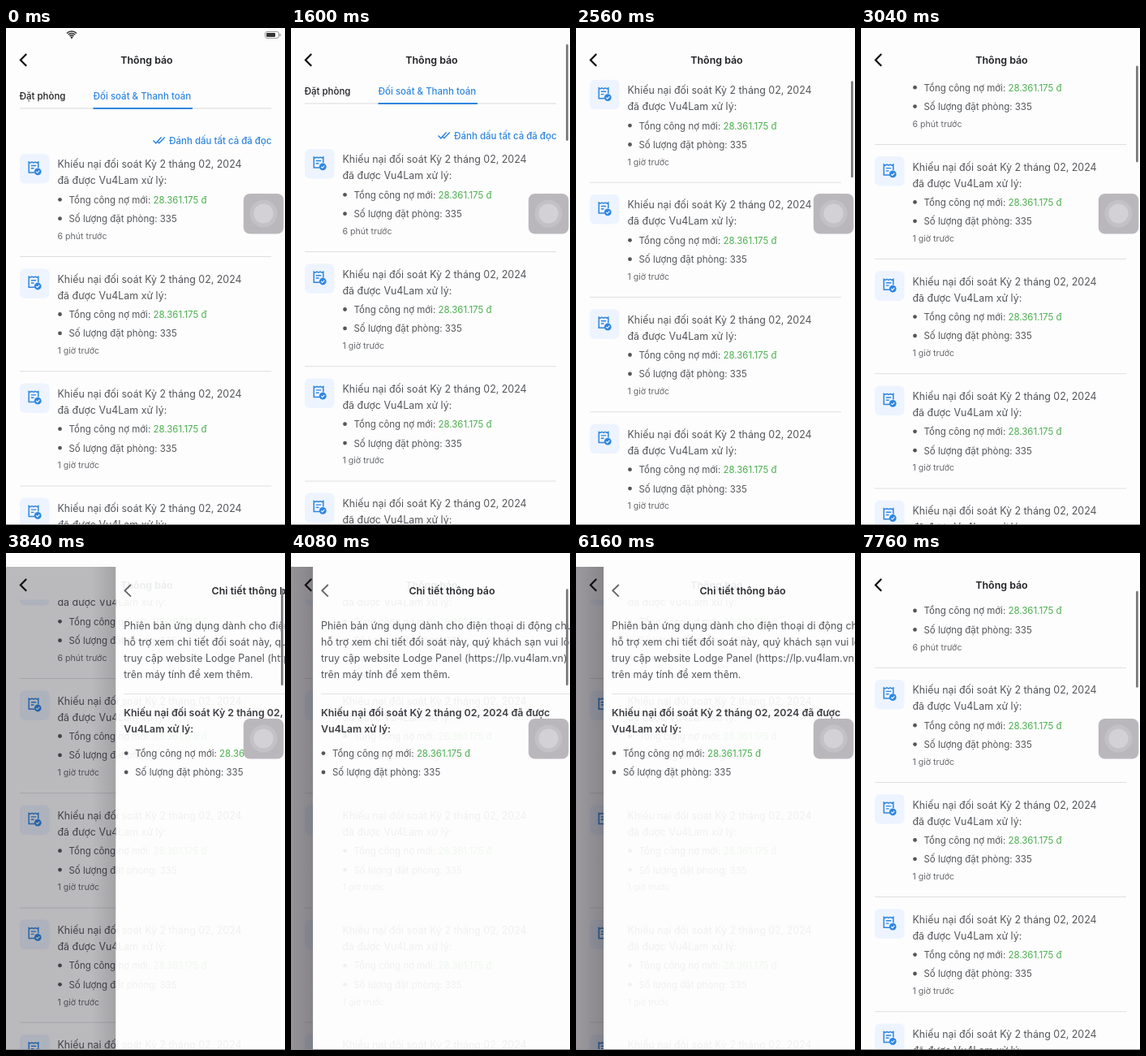
Recreate the animation shown at these times as an HTML page with a canvas. Size 344 by 612 pixels, loop 8 s.

```html
<!DOCTYPE html>
<html lang="vi">
<head>
<meta charset="utf-8">
<title>Thông báo</title>
<style>
html, body { margin: 0; width: 100%; height: 100%; overflow: hidden; background: #fdfdfd; }
canvas { display: block; width: 344px; height: 612px; }
</style>
</head>
<body>
<canvas id="stage"></canvas>
<script>
const W = 344, H = 612, LOOP = 8000, STEP = 80;
const BG = '#fdfdfd', BLUE = '#2f86e0', GREEN = '#4caf50', TEXT = '#54565a', DARK = '#1f2024';
const BIG = 12.41, MID = 11.47, SMALL = 10.58;
const PITCH = 141.2, REST = 127;

const canvas = document.getElementById('stage');
const ratio = window.devicePixelRatio || 1;
canvas.width = W * ratio;
canvas.height = H * ratio;
const c = canvas.getContext('2d');

const clamp = v => Math.max(0, Math.min(1, v));
const span = (t, a, b) => clamp((t - a) / (b - a));
const mix = (a, b, p) => a + (b - a) * p;
const easeOut = (p, n = 2) => 1 - (1 - p) ** n;

// y is the middle of the capital letters; returns the right end
function text(str, x, y, size, color = TEXT, weight = 400, align = 'left') {
  c.font = `${weight} ${size}px Inter, sans-serif`;
  c.textAlign = align;
  c.fillStyle = color;
  c.fillText(str, x, y + 4.4);
  return x + c.measureText(str).width;
}

function rect(x, y, w, h, color, r = 0) {
  c.fillStyle = color;
  c.beginPath();
  c.roundRect(x, y, w, h, r);
  c.fill();
}

function disc(x, y, r, color) {
  c.fillStyle = color;
  c.beginPath();
  c.arc(x, y, r, 0, 7);
  c.fill();
}

function line(points, color, width) {
  c.strokeStyle = color;
  c.lineWidth = width;
  c.beginPath();
  points.forEach(([x, y]) => c.lineTo(x, y));
  c.stroke();
}

function receipt(x, y) {
  rect(x, y, 36.5, 36.5, '#edf4ff', 6);
  c.save();
  c.translate(x + 10, y + 9);
  line([[8, 14], [1.2, 14], [1.2, 1], [3, 2], [5, 1], [7, 2], [9, 1], [11, 2], [12.8, 1], [12.8, 8]], BLUE, 1.5);
  line([[3.8, 5.5], [10.2, 5.5]], BLUE, 1.4);
  line([[3.8, 8.8], [7.5, 8.8]], BLUE, 1.4);
  disc(12.2, 12.8, 4.4, BLUE);
  line([[10.2, 12.8], [11.7, 14.3], [14.3, 11.5]], '#fff', 1.1);
  c.restore();
}

function bullets(x, y) {
  disc(x, y, 2.4, TEXT);
  const end = text('Tổng công nợ mới: ', x + 11, y, MID);
  text('28.361.175 đ', end, y, MID, GREEN);
  disc(x, y + 23.4, 2.4, TEXT);
  text('Số lượng đặt phòng: 335', x + 11, y + 23.4, MID);
}

function item(i, y, ghost) {
  if (!ghost) receipt(17, y - 13);
  text(`Khiếu nại đối soát Kỳ ${i < 5 ? 2 : 1} tháng 02, 2024`, 63.5, y, BIG);
  text('đã được Vu4Lam xử lý:', 63.5, y + 20, BIG);
  bullets(66.5, y + 43.3);
  text(i ? '1 giờ trước' : '6 phút trước', 63.5, y + 87.5, SMALL, '#686a6e');
  if (!ghost) rect(17, y + 113, 310, 1, '#dfdfe1');
}

function list(scroll, ghost) {
  c.save();
  c.beginPath();
  c.rect(0, 57.5, W, H);
  c.clip();
  c.translate(0, -scroll);
  text('Đặt phòng', 16.5, 83.3, MID, DARK, 500);
  text('Đối soát & Thanh toán', 107.5, 83.3, MID, BLUE, 500);
  rect(17, 98.5, 310, 1, '#d9d9dc');
  rect(107.5, 98, 122.5, 2, BLUE);
  line([[181.5, 138.5], [184.8, 141.8], [191.5, 134.5]], BLUE, 1.5);
  line([[187, 140], [188.8, 141.8], [195.8, 134.5]], BLUE, 1.5);
  text('Đánh dấu tất cả đã đọc', 327.5, 138.3, MID, BLUE, 500, 'right');
  for (let i = 0; i < 7; i++) item(i, 168 + i * PITCH, ghost);
  c.restore();
  text('Thông báo', 173.5, 40, BIG, DARK, 600, 'center');
  if (!ghost) line([[25.2, 32], [17.9, 39.4], [25.2, 46.8]], '#111', 2.2);
}

function detail(x) {
  c.save();
  c.beginPath();
  c.rect(x, 17, W, H);
  c.clip();
  rect(x, 17, W, H, BG);
  c.globalAlpha = .08;
  list(REST, true);
  c.globalAlpha = 1;
  c.translate(x, 0);
  line([[18.8, 39], [11.3, 46.3], [18.8, 53.6]], '#66686c', 1.9);
  text('Chi tiết thông báo', 171.5, 46.2, BIG, '#2b2c30', 600, 'center');
  ['Phiên bản ứng dụng dành cho điện thoại di động chưa',
   'hỗ trợ xem chi tiết đối soát này, quý khách sạn vui lòng',
   'truy cập website Lodge Panel (https://lp.vu4lam.vn)',
   'trên máy tính để xem thêm.'
  ].forEach((s, i) => text(s, 10, 89.5 + i * 20, BIG));
  rect(10, 173, 324, 1, '#e2e2e4');
  text('Khiếu nại đối soát Kỳ 2 tháng 02, 2024 đã được', 10, 196.7, BIG, '#3c3e42', 600);
  text('Vu4Lam xử lý:', 10, 216.7, BIG, '#3c3e42', 600);
  bullets(13, 246.6);
  c.restore();
}

// darkens the list, more so next to the page edge
function scrim(page) {
  rect(0, 17, W, H, `rgba(20, 16, 26, ${.47 * (1 - page / W)})`);
  const shade = c.createLinearGradient(page - 30, 0, page, 0);
  shade.addColorStop(0, 'rgba(0, 0, 0, 0)');
  shade.addColorStop(1, 'rgba(0, 0, 0, .12)');
  rect(page - 30, 17, 30, H, shade);
}

function statusBar(alpha) {
  c.globalAlpha = alpha;
  c.strokeStyle = '#333';
  c.lineWidth = 1.7;
  for (const r of [3.5, 6, 8.5]) {
    c.beginPath();
    c.arc(81, 12.5, r, -Math.PI * .75, -Math.PI * .25);
    c.stroke();
  }
  disc(81, 11.8, 1.3, '#333');
  c.lineWidth = 1;
  c.strokeStyle = '#999';
  c.beginPath();
  c.roundRect(319.5, 4.5, 17, 8, 2.5);
  c.stroke();
  rect(321, 6, 11, 5, '#333', 1);
  rect(337.5, 7, 1.2, 3, '#999', .5);
  c.globalAlpha = 1;
}

function touchButton() {
  rect(292.8, 204, 49.5, 49.5, '#bab7bc', 8);
  disc(317.5, 228.6, 17, '#c3c1c6');
  disc(317.5, 228.6, 12, '#d3d1d6');
}

function scrollAt(t) {
  if (t < 1120) return 0;
  if (t < 1600) return 3;
  if (t < 2400) return mix(6, 286, easeOut(span(t, 1600, 2400)));
  if (t < 7760) return mix(286, REST, easeOut(span(t, 2400, 3280), 2.05));
  return 140.3;
}

function pageAt(t) {
  if (t < 6160) return W * (1 - easeOut(span(t, 3560, 4240), 1.76));
  return mix(34, W, easeOut(span(t, 7120, 7440)));
}

function barAlpha(t) {
  if (t < 1120) return 0;
  return t < 7760 ? 1 - span(t, 4800, 5040) : 1;
}

function draw(t) {
  const scroll = scrollAt(t), page = pageAt(t);
  c.setTransform(ratio, 0, 0, ratio, 0, 0);
  rect(0, 0, W, H, BG);
  list(scroll);
  if (t < 560) statusBar(1 - span(t, 0, 560));
  if (page < W) {
    scrim(page);
    detail(page);
  }
  c.globalAlpha = barAlpha(t);
  rect(339, 20 + (scroll - 6) * .2, 2.8, 119, '#7c7c7f', 1.4);
  c.globalAlpha = 1;
  touchButton();
  rect(0, 611, W, 1, '#8c8c8e');
}

const start = performance.now();
function tick() {
  const t = (performance.now() - start) % LOOP;
  draw(Math.floor(t / STEP) * STEP);
  requestAnimationFrame(tick);
}
tick();
</script>
</body>
</html>
```
